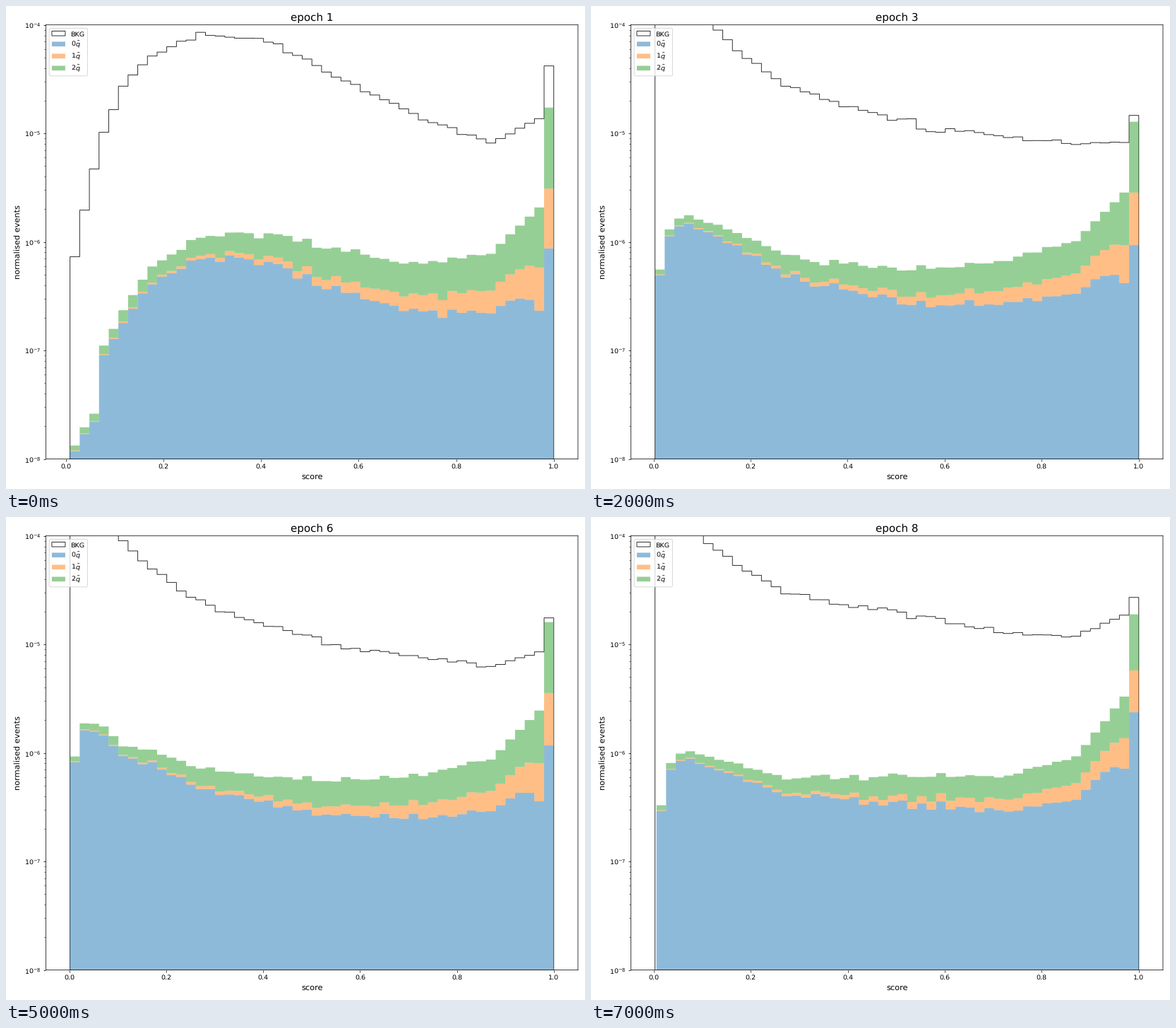
These frames come from a looping animation (820x683 px, 8 s). A matplotlib script:

```python
import matplotlib.pyplot as plt
import numpy as np
from matplotlib.animation import FuncAnimation
from matplotlib.patches import Patch

plt.rcParams.update({"path.snap": False, "text.hinting": "no_hinting"})

W, H = 820, 820 * 10 / 12
FLOOR, DECADES, SPAN = -8, 4, 614  # heights run 0..SPAN on the log axis
BINS = 50
BIN = np.arange(BINS)
X = BIN / (BINS - 1)
KNOTS = [0, 1, 2, 3, 5, 8, 13, 20, 28, 36, 43, 48, 49]


def epoch(start, sig_start, spread, bkg, total):
    """Key heights of both outlines; spread sets how far the classes part."""
    return dict(start=start, sig_start=sig_start, spread=spread,
                bkg=np.interp(BIN, KNOTS, bkg),
                total=np.interp(BIN, KNOTS, total))


def between(a, b):
    return {key: (a[key] + b[key]) / 2 for key in a}


e1 = epoch(.0086, .0086, 85,
           [286, 352, 410, 462, 527, 571, 604, 590, 536, 481, 446, 481, 556],
           [19, 45, 64, 160, 210, 274, 314, 319, 293, 275, 291, 356, 497])
e2 = epoch(.0008, .0008, 92,
           [700, 700, 680, 650, 607, 577, 531, 491, 454, 432, 401, 425, 479],
           [320, 365, 362, 355, 338, 322, 301, 279, 268, 266, 292, 353, 477])
e3 = epoch(.003, .003, 74,
           [700, 700, 690, 670, 622, 577, 529, 496, 468, 455, 446, 448, 486],
           [268, 325, 340, 344, 333, 320, 289, 274, 268, 282, 309, 377, 477])
e5 = epoch(.004, .0107, 66,
           [591, 700, 700, 690, 650, 597, 553, 522, 498, 483, 480, 472, 494],
           [171, 248, 281, 288, 296, 296, 287, 274, 286, 296, 321, 397, 481])
e6 = epoch(.0008, .0008, 74,
           [700, 690, 675, 655, 607, 566, 520, 488, 457, 444, 429, 450, 498],
           [302, 349, 348, 345, 317, 308, 285, 273, 270, 277, 299, 367, 492])
e8 = epoch(.0025, .0054, 58,
           [700, 690, 675, 650, 604, 573, 534, 518, 500, 476, 472, 502, 527],
           [233, 293, 306, 309, 301, 290, 272, 274, 274, 275, 301, 387, 503])
e4 = between(e3, e5)
e7 = between(e6, e8) | dict(start=e6["start"])
EPOCHS = [e1, e2, e3, e4, e5, e6, e7, e8]

LINE = dict(ec=(0, 0, 0, .85), lw=1)
COLORS = ["tab:blue", "tab:orange", "tab:green"]
HANDLES = [Patch(fc="none", label="BKG", **LINE)] + [
    Patch(fc=color, alpha=.5, lw=0, label=rf"${n}\tilde{{q}}$")
    for n, color in enumerate(COLORS)]

fig = plt.figure(figsize=(12, 10), dpi=W / 12, facecolor="white")
ax = fig.add_axes([56.4 / W, 42.5 / H, 753.6 / W, (SPAN - .2) / H])


def events(height):
    return 10 ** (FLOOR + DECADES * height / SPAN)


def heights(i):
    """Background outline and the three stacked tops, slightly ragged."""
    e = EPOCHS[i]
    rng = np.random.default_rng(i)
    ragged = np.sin(np.pi * X) * rng.normal(0, 3, (3, BINS))

    total = e["total"] + ragged[1]
    gap = 8 + e["spread"] * (X + 1.25 * np.exp((BIN - BINS + 1) / 1.5))
    zero = total - gap + ragged[2]
    one = zero + .42 * gap * X + 1
    return e["bkg"] + ragged[0], (zero, one, total)


def draw(i):
    start, sig_start = EPOCHS[i]["start"], EPOCHS[i]["sig_start"]
    bkg, stack = heights(i)
    base = 10.0 ** (FLOOR - 1)
    ax.clear()
    ax.set_yscale("log")

    ax.stairs(events(bkg), np.linspace(start, 1, BINS + 1),
              baseline=base, **LINE)

    edges = np.linspace(sig_start, 1, BINS + 1)
    low = np.full(BINS, base)
    for height, color in zip(stack, COLORS):
        top = events(height)
        ax.stairs(top, edges, baseline=low, fill=True, color=color,
                  alpha=.5, lw=0)
        low = top

    margin = .05 * (1 - start)
    ax.set_xlim(start - margin, 1 + margin)
    ax.set_ylim(10.0 ** FLOOR, 10.0 ** (FLOOR + DECADES))
    ax.set_xticks(np.arange(6) / 5)
    ax.set_xlabel("score", fontsize=12)
    ax.set_ylabel("normalised events", fontsize=12)
    ax.set_title(f"epoch {i + 1}", fontsize=16)
    ax.legend(handles=HANDLES, loc="upper left", labelspacing=.39)
    return []


anim = FuncAnimation(fig, draw, frames=len(EPOCHS), interval=1000,
                     init_func=lambda: [], repeat=True, repeat_delay=0)
plt.show()
```
